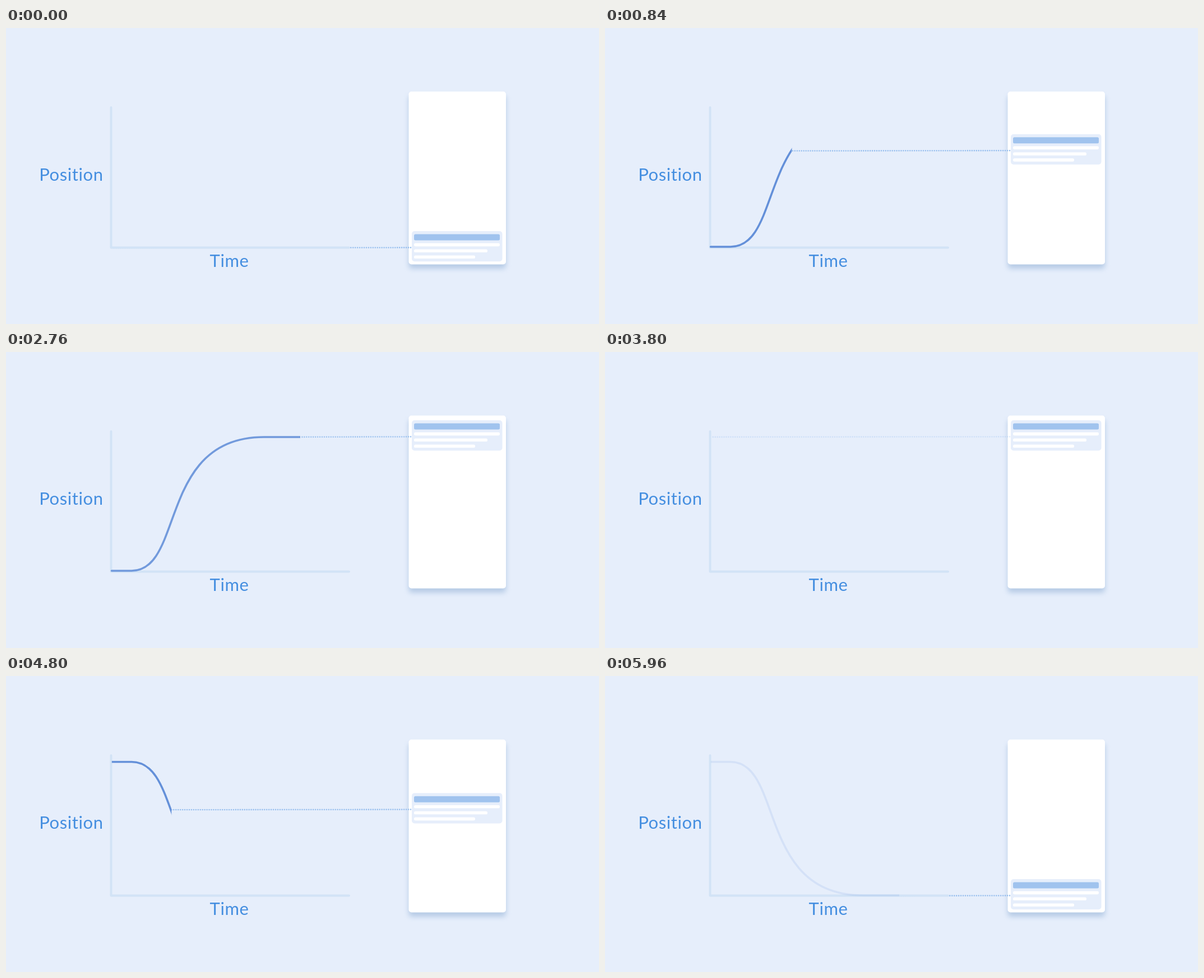
Write an HTML page that moves like this. It is 1058 px wide and 529 px high and loops after 6 s.

```html
<!DOCTYPE html>
<html lang="en">
<head>
<meta charset="utf-8">
<title>Easing curve</title>
<style>
html, body { margin: 0; width: 100%; height: 100%; overflow: hidden; background: #e6eefb; }
svg { display: block; width: 100%; height: 100%; }
text { font: 31px Lato, "Open Sans", sans-serif; letter-spacing: .6px; fill: #448ee0; }
</style>
</head>
<body>
<svg viewBox="0 0 1058 529">
  <defs>
    <filter id="soft" x="-20%" y="-20%" width="140%" height="140%"><feGaussianBlur stdDeviation="5"/></filter>
    <clipPath id="reveal"><rect id="window" y="100" height="320"/></clipPath>
  </defs>
  <text x="59.2" y="273">Position</text>
  <text x="363.6" y="427">Time</text>

  <rect x="718.5" y="121" width="173.5" height="309" rx="5" fill="#9cb8da" opacity=".65" filter="url(#soft)"/>
  <rect x="718.5" y="113.5" width="173.5" height="309" rx="5" fill="#fff"/>
  <g id="item">
    <rect x="724" width="161.5" height="54.3" rx="5" fill="#e6eefb"/>
    <rect x="728" y="5.5" width="153" height="11" rx="2.5" fill="#a0c3ee"/>
    <g fill="#fff">
      <rect x="728" y="21.6" width="153" height="5.6" rx="2.6"/>
      <rect x="728" y="32.5" width="131" height="5.6" rx="2.6"/>
      <rect x="728" y="43.4" width="109" height="5.6" rx="2.6"/>
    </g>
  </g>

  <path id="dots" fill="none" stroke="#98bfee" stroke-width="2.6" stroke-linecap="round" stroke-dasharray="0 3.95"/>
  <path d="M187.5 142V392.4H612" fill="none" stroke="#d2e3f6" stroke-width="4" stroke-linecap="round" stroke-linejoin="round"/>
  <g clip-path="url(#reveal)">
    <path id="curve" fill="none" stroke="#6490d9" stroke-width="3.6" stroke-linecap="round"/>
  </g>
</svg>
<script>
const $ = id => document.getElementById(id);
const LOOP = 6000, STEP = 40;
const LEFT = 188, RIGHT = 524;         // extent of the plotted line
const EASE_FROM = 224, EASE_TO = 460;  // part of it that moves
const LOW = 363, HIGH = 122;           // resting tops of the item

const clamp = v => Math.min(1, Math.max(0, v));
const smooth = v => v * v * (3 - 2 * v);

// cubic-bezier(.4, 0, .2, 1)
function ease(x) {
  let a = 0, b = 1;
  for (let i = 0; i < 24; i++) {
    const p = (a + b) / 2, q = 1 - p;
    if (1.2 * p * q * q + .6 * p * p * q + p * p * p < x) a = p; else b = p;
  }
  return smooth(a);
}

function curvePath(y0, y1) {
  const w = EASE_TO - EASE_FROM;
  return `M${LEFT + .5} ${y0}H${EASE_FROM}C${EASE_FROM + .4 * w} ${y0} ${EASE_FROM + .2 * w} ${y1} ${EASE_TO} ${y1}H${RIGHT + 6}`;
}

function draw(t) {
  const up = t < 3400;
  const start = up ? 608 : 4608;
  const fade = 1 - clamp((t - (up ? 2730 : 5730)) / 268);
  const tip = LEFT + (RIGHT - LEFT) * smooth(clamp((t - start) / 512));
  const moved = ease(clamp((tip - EASE_FROM) / (EASE_TO - EASE_FROM)));
  const top = LOW + (HIGH - LOW) * (up ? moved : 1 - moved);
  const y = top + 29.4;
  const appear = 1 - (1 - clamp((t - 3760) / 240)) ** 2;
  const clipLeft = up ? 180 : 188.8;

  $("item").setAttribute("transform", `translate(0 ${top})`);
  $("dots").setAttribute("d", `M722 ${y}L${tip + 1} ${y + .5}`);
  $("dots").setAttribute("opacity", up ? fade : appear);
  $("curve").setAttribute("d", up ? curvePath(391, 152) : curvePath(153.5, 392));
  $("curve").setAttribute("opacity", t < start ? 0 : fade);
  $("window").setAttribute("x", clipLeft);
  $("window").setAttribute("width", tip + 1 - clipLeft);
}

const begin = performance.now();
function tick() {
  const t = (performance.now() - begin) % LOOP;
  draw(Math.floor(t / STEP) * STEP);
  requestAnimationFrame(tick);
}
tick();
</script>
</body>
</html>
```
